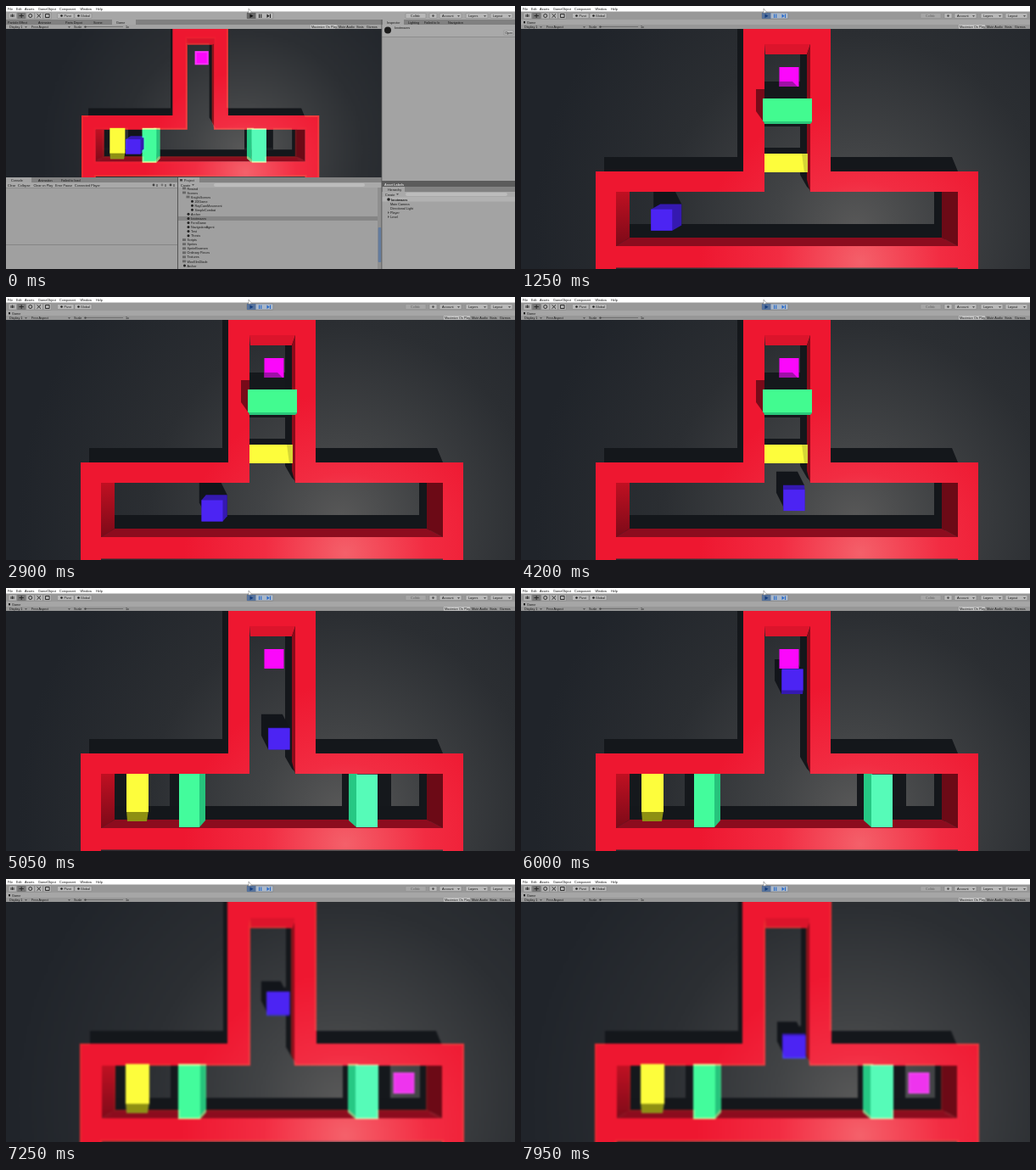
Animation, 600 px wide and 310 px high, one loop 8000 ms. Source, as an HTML page:

```html
<!DOCTYPE html>
<html lang="en">
<head>
<meta charset="utf-8">
<title>Door maze in an editor</title>
<style>
  html, body { margin: 0; width: 100%; height: 100%; overflow: hidden; background: #9c9c9c; }
  svg { display: block; width: 600px; height: 310px; }
  text { font: 3.75px "Liberation Sans", Arial, sans-serif; fill: #161616; white-space: pre; }
  .bold { font-weight: bold; }
</style>
</head>
<body>
<svg id="stage" viewBox="0 0 600 310">
  <defs>
    <radialGradient id="floor" gradientUnits="userSpaceOnUse" cx="395" cy="262" r="380">
      <stop offset="0" stop-color="#585858"/><stop offset=".25" stop-color="#414345"/>
      <stop offset=".6" stop-color="#2b2e32"/><stop offset="1" stop-color="#20242a"/>
    </radialGradient>
    <radialGradient id="red" gradientUnits="userSpaceOnUse" cx="400" cy="302" r="190">
      <stop offset="0" stop-color="#f4606a"/><stop offset=".5" stop-color="#f22c42"/><stop offset="1" stop-color="#ee1730"/>
    </radialGradient>
    <linearGradient id="leftFace" x2="0" y2="1">
      <stop offset="0" stop-color="#c01022"/><stop offset="1" stop-color="#7c0a18"/>
    </linearGradient>
    <filter id="soft" filterUnits="userSpaceOnUse" x="-120" y="-40" width="840" height="420"
            color-interpolation-filters="sRGB">
      <feMorphology operator="dilate" radius="1"/><feGaussianBlur stdDeviation="1"/>
    </filter>
    <clipPath id="view"><rect id="viewBox" y="27"/></clipPath>
  </defs>

  <g clip-path="url(#view)"><g id="scene">
    <rect x="-120" y="-40" width="840" height="420" fill="url(#floor)"/>
    <g fill="#14171b">
      <path d="M255 0V178H98V195H264V0ZM364 178H508L515 195H364Z"/>
      <path d="M329 50H341V217L337 213L329 199ZM120 257H487V215H500V276H120Z"/>
    </g>
    <g id="shadowsA" fill="#15181c">
      <path d="M128 219H142V257H128ZM193 219H204V257H193ZM396 219H404V257H396ZM438 219H454V257H438Z"/>
    </g>
    <path id="shadowsB" fill="#15181c" d="M287 89H329V110H287ZM287 139H329V142H287ZM287 167H329V175H287Z"/>
    <path id="blueShadow" fill="#12151a"/>
    <path fill="url(#leftFace)" d="M112 219H128V273L112 283Z"/>
    <path fill="#6c0a16" d="M515 219H496V273L515 283Z"/>
    <path fill="#8c0c1e" d="M112 283L128 273H496L515 283Z"/>
    <path fill="#dc142b" d="M287 45H341L337 57H288Z"/>
    <path fill="#8a0b1a" d="M341 45L337 57V205L341 219Z"/>
    <path fill="url(#red)" fill-rule="evenodd"
      d="M262 0H365V195H539V350H88V195H262ZM287 45H341V219H515V283H112V219H287ZM112 308.5H515V350H112Z"/>
    <rect id="magenta" width="23" height="23"/>
    <g id="doorsA">
      <path fill="#8e9012" d="M142 262H168L166 275H143Z"/>
      <path fill="#fdfd3c" d="M142 219H168V264H142Z"/>
      <path fill="#26c47c" d="M226 219H235V274L228 282Z"/>
      <path fill="#43fc9c" d="M204 219H228V282H204Z"/>
      <path fill="#26c884" d="M414 219H404V274L413 282Z"/>
      <path fill="#56fbb8" d="M413 220H438V282H413Z"/>
    </g>
    <g id="doorsB">
      <path fill="#a010a8" d="M305 89H320L326 95H305Z"/>
      <path fill="#780a19" d="M277 98H287V138L277 124Z"/>
      <path fill="#2bc87a" d="M285 134H343V137L341 139H287Z"/>
      <path fill="#42fb90" d="M285 109H343V136H285Z"/>
      <path fill="#fdfd3c" d="M287 174H338V196H287Z"/>
      <path fill="#d6d735" d="M331 174H338V196H334Z"/>
    </g>
    <path id="blueSides" fill="#3519b0"/>
    <rect id="blueTop" width="25" height="25" fill="#4c24f3"/>
  </g></g>

  <g id="editor"></g>
  <g id="playing"></g>
  <g id="common"></g>
</svg>

<script>
const LOOP = 8000, MAXIMIZE = 450, SWAP_IN = 1000, SWAP_OUT = 4450, CATCH = 6050;
const CENTER = { x: 314, y: 168 }, DEPTH = 0.074, HALF = 12.5;
const bluePath = [
  [0, 185, 253], [1000, 185, 253], [1300, 162, 252], [1820, 162, 252], [3955, 322, 252], [4030, 322, 252],
  [5050, 322, 178], [6015, 320, 107], [6720, 320, 107], [7950, 322, 198], [8000, 322, 202]
];

const $ = id => document.getElementById(id);
const set = (id, attrs) => { for (const k in attrs) $(id).setAttribute(k, attrs[k]); };
const show = (id, on) => { $(id).style.display = on ? '' : 'none'; };

// Interface markup helpers
const box = (x, y, w, h, fill, extra = '') =>
  `<rect x="${x}" y="${y}" width="${w}" height="${h}" fill="${fill}" ${extra}/>`;
const label = (s, x, y, cls = '') => `<text x="${x}" y="${y}" class="${cls}">${s}</text>`;
const labels = (y, items) => items.map(([s, x]) => label(s, x, y)).join('');
const button = (x, w, s, inset = 3, fill = '#b9b9b9') =>
  box(x, 8.5, w, 6, fill, 'rx="1" stroke="#777" stroke-width=".4"') + label(s, x + inset, 13);
const shape = (d, fill) => `<path d="${d}" fill="${fill}"/>`;
const dot = (x, y, r, fill = '#222') => `<circle cx="${x}" cy="${y}" r="${r}" fill="${fill}"/>`;
const arrow = (x, y) => shape(`M${x} ${y}h3l-1.5 2z`, '#555');

function gameBar(width, gray) {
  const right = width - 85;
  return box(0, 22, width, 5, gray) + box(right + 1, 22.2, 31, 4.6, '#c6c6c6') +
    labels(26, [['Display 1', 4], ['Free Aspect', 30], ['Scale', 80], ['1x', 141],
      ['Maximize On Play', right + 2], ['Mute Audio', right + 34], ['Stats', right + 55], ['Gizmos', right + 67]]) +
    box(93, 24.3, 45, .6, '#555') + dot(93.5, 24.6, 1.2, '#444') + arrow(22, 24) + arrow(73, 24);
}

function playButtons(fill, pressed, icon) {
  return box(284, 8, 31, 7, fill, 'rx="1" stroke="#666" stroke-width=".4"') + box(284, 8, 10.5, 7, pressed) +
    shape('M287.5 9.5v4.4l4-2.2z', icon[0]) +
    shape('M298 9.5h1.1v4.4h-1.1zM300.2 9.5h1.1v4.4h-1.1zM307.5 9.5v4.4l3.2-2.2zM311 9.5h1v4.4h-1z', icon[1]);
}

const tree = [
  ['Rewind', 0], ['Scenes', 0], ['KnightScenes', 1], ['2DGame', 2], ['RayCamMovement', 2], ['SimpleCombat', 2],
  ['Archer', 1], ['knotmazes', 1], ['FernGame', 1], ['NavigationAgent', 1], ['Test', 1], ['Thesis', 1],
  ['Scripts', 0], ['Sprites', 0], ['SpriteBowmen', 0], ['Ordinary Pieces', 0], ['Textures', 0],
  ['WeeElmGlade', 0], ['Archer', 0]
];
const treeRow = ([name, depth], i) => {
  const x = 209 + depth * 4.5, y = 216.5 + i * 5.06;
  const isScene = depth === 2 || (depth === 1 && i > 2) || i === 18;
  const icon = isScene ? dot(x + 1.5, y - 1.5, 1.5) : box(x - 1, y - 3, 4, 2.8, '#686868');
  return (i === 7 ? box(203, y - 4, 235, 5, '#858585') : '') + icon + label(name, x + 4.5, y);
};

$('common').innerHTML =
  box(0, 0, 600, 6.5, '#fff') +
  labels(4.7, [['File', 2], ['Edit', 12], ['Assets', 22], ['GameObject', 38], ['Component', 63], ['Window', 87.5], ['Help', 106]]) +
  [3, 13.5, 24, 34, 44].map((x, i) => box(x, 8, 9.5, 7, i === 1 ? '#777' : '#b4b4b4', 'stroke="#777" stroke-width=".4"')).join('') +
  `<g fill="none" stroke="#222" stroke-width=".9"><path d="M6 13v-3M7.5 13v-3.5M9 13v-3M15.5 11.5h5.4M18.2 9v5M36.5 9.3l4.5 4.4M36.5 13.7l4.5-4.4M46.5 9.5h4.6v4h-4.6z"/><circle cx="28.7" cy="11.5" r="2"/></g>` +
  button(60.5, 19.5, 'Pivot', 8) + button(81, 20, 'Global', 7) + dot(65.5, 11.5, 1.3) + dot(85.5, 11.5, 1.3) +
  button(511, 26, 'Account') + button(542, 26, 'Layers') + button(571, 26, 'Layout') +
  button(499, 9, '') + dot(503.5, 11.6, 1.3, '#555') +
  [532, 563, 592].map(x => arrow(x, 11)).join('') +
  '<path d="M286 3v6l1.5-1.3 2.5.1z" fill="#fff" stroke="#444" stroke-width=".4"/>';

$('playing').innerHTML =
  box(0, 6.5, 600, 9.5, '#989898') + box(0, 16, 600, 6, '#a6a6a6') +
  box(3, 18, 2, 2.4, '#222') + label('Game', 7, 20.6) + gameBar(600, '#979797') +
  playButtons('#aab7c8', '#56729b', ['#123b7e', '#2469cc']) +
  `<g opacity=".45">${button(471, 24, 'Collab', 6)}</g>`;

$('editor').innerHTML =
  box(0, 6.5, 600, 9.5, '#a6a6a6') + box(0, 16, 600, 6, '#808080') + box(125, 16, 28, 6, '#a6a6a6') +
  labels(20.6, [['Particle Effect', 2], ['Animator', 38], ['Parts Depot', 70], ['Scene', 103], ['Game', 130]]) +
  gameBar(443, '#a2a2a2') + `<g id="pressed">${playButtons('#b5b5b5', '#666', ['#111', '#222'])}</g>` +
  `<g id="starting">${playButtons('#aab7c8', '#56729b', ['#123b7e', '#2469cc'])}</g>` + button(471, 24, 'Collab', 6) +
  // console
  box(0, 202, 443, 108, '#a0a0a0') + box(0, 202, 443, 6, '#828282') + box(0, 202, 30, 6, '#a4a4a4') +
  labels(206.8, [['Console', 6], ['Animation', 38], ['Failed to load', 65]]) +
  box(0, 208, 202, 6, '#a9a9a9') + box(0, 214, 202, .5, '#777') +
  labels(212.6, [['Clear', 2], ['Collapse', 14], ['Clear on Play', 32.5], ['Error Pause', 58], ['Connected Player', 81], ['0', 177], ['0', 187], ['0', 197]]) +
  dot(174, 211, 1.4, '#444') + dot(184, 211, 1.4, '#777') + dot(194, 211, 1.4, '#444') + box(0, 281, 202, .6, '#747474') +
  // project
  box(202, 202, 1, 108, '#555') + box(203, 202, 25, 6, '#a4a4a4') + label('Project', 210, 206.8) +
  box(205, 204, 3, 2.5, '#444') + box(203, 208, 240, 6, '#a9a9a9') + label('Create', 206, 212.6) + arrow(219, 210) +
  box(245, 209, 178, 4, '#bcbcbc', 'rx="2"') + tree.map(treeRow).join('') +
  box(438, 214, 5, 96, '#8f8f8f') + box(438.7, 261, 3.6, 41, '#647c9e', 'rx="1"') +
  // inspector
  box(443, 16, 157, 294, '#a3a3a3') + box(443, 16, 157, 6, '#808080') + box(444, 16, 25, 6, '#a6a6a6') +
  labels(20.6, [['Inspector', 449], ['Lighting', 474], ['Failed to lo', 493], ['Navigation', 521]]) +
  box(443, 22, 157, 14, '#a9a9a9') + dot(450, 28.5, 4, '#1c1c1c') + label('knotmazes', 458, 27) +
  box(587, 29, 11, 5, '#bcbcbc', 'stroke="#777" stroke-width=".4"') + label('Open', 588.2, 33) + box(443, 36, 157, .5, '#777') +
  box(443, 206, 157, 7, '#5c5c5c') + `<text class="bold" x="446" y="211.5" style="fill:#ddd">Asset Labels</text>` +
  // hierarchy
  box(443, 213, 157, 6, '#828282') + box(444, 213, 26, 6, '#a4a4a4') + label('Hierarchy', 450, 217.8) +
  box(443, 219, 157, 6, '#a9a9a9') + label('Create', 447, 223.5) + arrow(460, 221) + box(471, 220, 120, 4, '#bcbcbc', 'rx="2"') +
  box(443, 225, 157, 5.5, '#b2b2b2') + dot(451, 228, 1.8) + label('knotmazes', 454, 229.5, 'bold') +
  ['Main Camera', 'Directional Light', 'Player', 'Level'].map((s, i) =>
    label(s, 453, 234.7 + i * 5.1) + (i > 1 ? shape(`M450 ${231.7 + i * 5.1}v3l2-1.5z`, '#555') : '')).join('') +
  box(442.5, 16, .8, 294, '#555');

// Outline of a square swept from (x, y) by (dx, dy)
function sweep(x, y, dx, dy) {
  const sx = dx < 0 ? -HALF : HALF, sy = dy < 0 ? -HALF : HALF;
  const points = [[-sx, sy], [-sx + dx, sy + dy], [sx + dx, sy + dy], [sx + dx, -sy + dy], [sx, -sy], [-sx, -sy]];
  return 'M' + points.map(([px, py]) => `${x + px} ${y + py}`).join('L') + 'Z';
}

function along(path, t) {
  const i = path.findIndex(p => p[0] > t);
  const [t0, x0, y0] = path[i - 1], [t1, x1, y1] = path[i];
  const u = (t - t0) / (t1 - t0);
  return [x0 + (x1 - x0) * u, y0 + (y1 - y0) * u];
}

function draw(t) {
  const full = t >= MAXIMIZE, swapped = t >= SWAP_IN && t < SWAP_OUT, caught = t >= CATCH;
  show('editor', !full);
  show('playing', full);
  show('pressed', t < 100);
  show('starting', t >= 100);
  show('doorsA', !swapped);
  show('shadowsA', !swapped);
  show('doorsB', swapped);
  show('shadowsB', swapped);
  set('viewBox', { width: full ? 600 : 443, height: full ? 283 : 175 });
  set('scene', {
    transform: full ? '' : 'translate(35.7 9.7) scale(.617)',
    filter: !full || caught ? 'url(#soft)' : 'none'
  });
  set('magenta', caught ? { x: 457.5, y: 229, fill: '#ee34ee' } : { x: 304.5, y: 72, fill: '#fb08fb' });

  const [x, y] = along(bluePath, t);
  const dx = (CENTER.x - x) * DEPTH, dy = (CENTER.y - y) * DEPTH;
  set('blueTop', { x: x - HALF, y: y - HALF });
  set('blueSides', { d: sweep(x, y, dx, dy) });
  set('blueShadow', { d: sweep(x + dx, y + dy, -8, -16) });
}

const start = performance.now();
function frame() {
  draw((performance.now() - start) % LOOP);
  requestAnimationFrame(frame);
}
frame();
</script>
</body>
</html>
```
